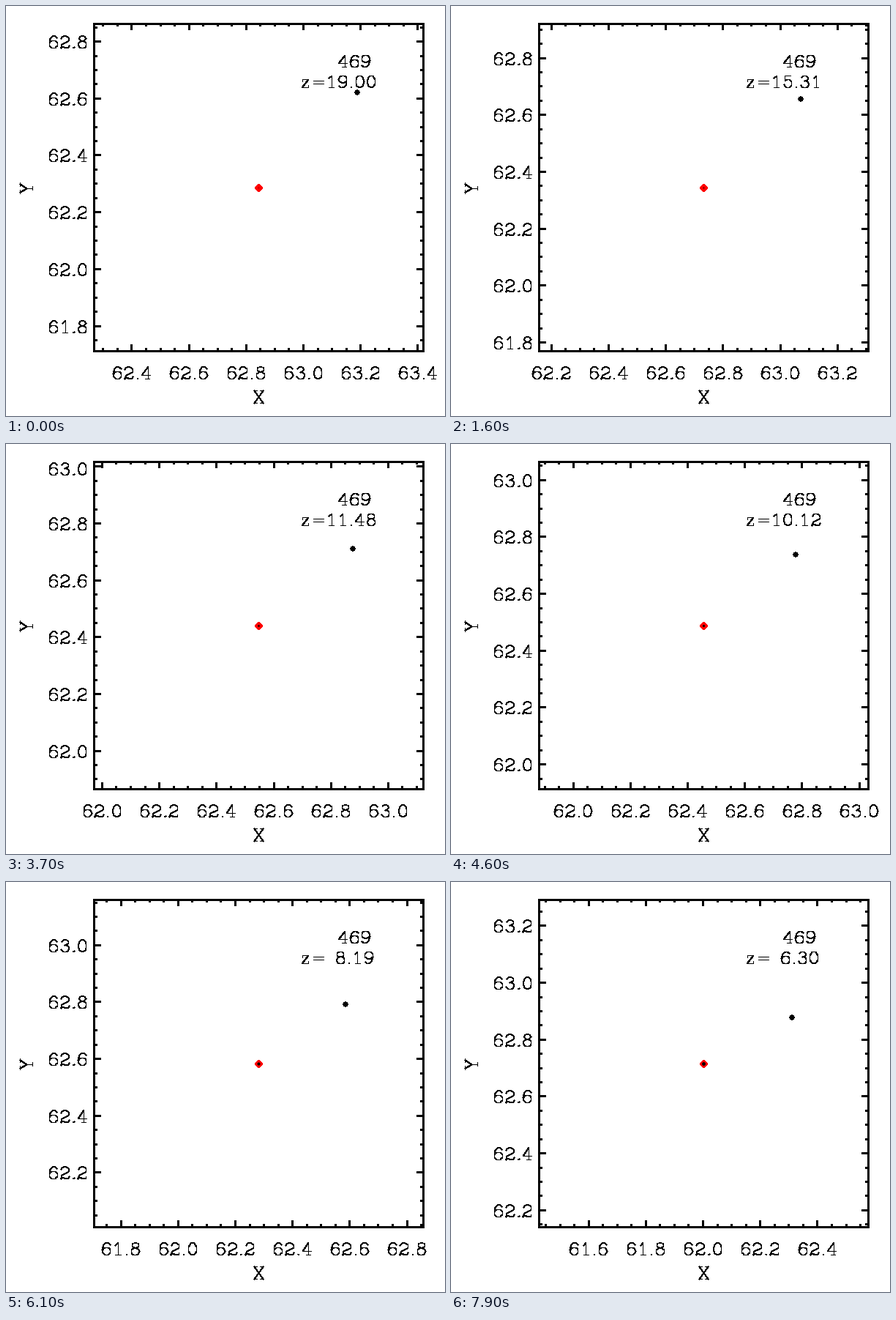
Recreate the animation shown at these times as a matplotlib script. Size 600x560 px, loop 8 s.

```python
import math

import numpy as np
import matplotlib.pyplot as plt
from matplotlib.animation import FuncAnimation
from matplotlib.collections import LineCollection
from matplotlib.patches import Circle, Polygon

W, H, DPI = 600, 560, 100
FRAMES, STEP_MS = 80, 100
PX = 72 / DPI                      # one pixel in points

LEFT, RIGHT, TOP, BOTTOM = 120.5, 570.5, 24.5, 471.5
MX, MY = 345.5, 248.5              # where the followed object stays
SPAN = 1.151                       # data units across the plot
SX, SY = (RIGHT - LEFT) / SPAN, (BOTTOM - TOP) / SPAN
MINOR = 0.05
LABEL, NOTE = 0.79, 0.775          # pixels per glyph unit

# Expansion: 1 + z decays exponentially; positions run linearly in 1 / (1 + z).
Z0, RATE = 19.0, 0.012754
KEYS = np.array([0, 37, 55, 67, 79])
MID_X = [62.844, 62.5475, 62.354, 62.204, 62.0025]
MID_Y = [62.2854, 62.4394, 62.5404, 62.6274, 62.7144]
DOT_X = [480, 474, 467, 460, 466]
DOT_Y = [118, 143, 159, 175, 185]


def growth(i):
    return np.exp(RATE * i) / (1 + Z0)


# ---- stroke font: 21 units high, y down ---------------------------------

def arc(cx, cy, rx, ry, start=0, end=360):
    """Elliptic arc, clockwise on screen, 0 degrees at the right."""
    t = np.radians(np.linspace(start, end, 2 + (end - start) // 24))
    return list(zip(cx + rx * np.cos(t), cy + ry * np.sin(t)))


def bar(x0, x1, y):
    return [(x0, y), (x1, y)]


def turn(strokes):
    return [[(20 - x, 21 - y) for x, y in s] for s in strokes]


SIX = [arc(11, 12, 8, 12, 180, 310), arc(10, 14.5, 7, 6.5)]

# Each glyph: advance width, then its strokes.
GLYPHS = {
    "0": (20, [arc(10, 10.5, 7, 10.5)]),
    "1": (20, [[(6, 4), (10.5, 0), (10.5, 21)], bar(6, 15, 21)]),
    "2": (20, [arc(10, 6, 7, 6, 200, 400) + [(5, 15), (3, 21)],
               [(3, 20), (5, 18), (12, 21), (16, 20), (17, 17)]]),
    "3": (20, [arc(10, 4.5, 6, 4.5, 200, 450), arc(10, 15, 7, 6, 270, 520)]),
    "4": (20, [[(13, 21), (13, 0), (2, 15), (18, 15)], bar(9, 16, 21)]),
    "5": (20, [[(15, 0), (5, 0)] + arc(10, 14, 7, 7, 220, 520)]),
    "6": (20, SIX),
    "7": (20, [[(3, 6), (3, 3), (7, 0), (13, 3), (17, 0), (16, 6),
                (11, 13), (10, 21)]]),
    "8": (20, [arc(10, 4.5, 6, 4.5), arc(10, 15, 7, 6)]),
    "9": (20, turn(SIX)),
    ".": (10, [arc(5, 20, 0.8, 0.8)]),
    "=": (26, [bar(4, 22, 9), bar(4, 22, 15)]),
    " ": (16, []),
    "X": (20, [[(3, 0), (17, 21)], [(17, 0), (3, 21)]]
          + [bar(x, x + 6, y) for x in (1, 13) for y in (0, 21)]),
    "Y": (21, [[(4, 0), (10.5, 11), (10.5, 21)], [(17, 0), (10.5, 11)],
               bar(1, 7, 0), bar(14, 20, 0), bar(7, 14, 21)]),
    "z": (18, [[(3, 11), (3, 7), (14, 7), (2, 21), (14, 21), (14, 17)]]),
}


def snap(v):
    return math.floor(v) + 0.5


def text(s, x, base, unit=LABEL, align=0.0, upright=True):
    """Pixel-snapped strokes of a string; base is the baseline row."""
    pen = -align * unit * sum(GLYPHS[c][0] for c in s)
    out = []
    for c in s:
        adv, strokes = GLYPHS[c]
        for stroke in strokes:
            pts = [(pen + u * unit, (v - 21) * unit) for u, v in stroke]
            if not upright:
                pts = [(dy, -dx) for dx, dy in pts]
            out.append([(snap(x + dx), snap(base + dy + 0.5))
                        for dx, dy in pts])
        pen += adv * unit
    return out


# ---- plot ---------------------------------------------------------------

def ticks(mid):
    """Tick values in view, each with its length and a flag for a label."""
    first = math.ceil((mid - SPAN / 2) / MINOR)
    last = math.floor((mid + SPAN / 2) / MINOR)
    for k in range(first, last + 1):
        major = k % 4 == 0
        yield k * MINOR, 9 if major else 4.5, major


def build(xm, ym, z):
    marks = []
    words = text("469", 453, 83, NOTE) + text(f"z={z:5.2f}", 403, 111, NOTE)
    words += text("X", MX, 542, align=0.5)
    words += text("Y", 36, MY, align=0.5, upright=False)
    for v, n, major in ticks(xm):
        x = MX + (v - xm) * SX
        p = snap(x)
        marks += [[(p, BOTTOM), (p, BOTTOM - n)], [(p, TOP), (p, TOP + n - 1)]]
        if major:
            words += text(f"{v:.1f}", x, 509, align=0.5)
    for v, n, major in ticks(ym):
        y = MY - (v - ym) * SY
        p = snap(y)
        marks += [[(LEFT, p), (LEFT + n, p)], [(RIGHT, p), (RIGHT - n, p)]]
        if major:
            base = min(max(math.floor(y + 9), 42), 469)
            words += text(f"{v:.1f}", 57, base)
    return marks, words


fig = plt.figure(figsize=(W / DPI, H / DPI), dpi=DPI, facecolor="white")
ax = fig.add_axes([0, 0, 1, 1])
ax.set(xlim=(0, W), ylim=(H, 0))
ax.axis("off")


def strokes(width, cap, segments=()):
    lines = LineCollection(segments, colors="black", linewidths=width * PX,
                           antialiaseds=False, capstyle=cap)
    lines.set_snap(False)
    return ax.add_collection(lines, autolim=False)


def shape(patch, color, order):
    patch.set(facecolor=color, edgecolor="none", antialiased=False,
              zorder=order)
    return ax.add_patch(patch)


strokes(3, "projecting", [[(LEFT, y), (RIGHT, y)] for y in (TOP, BOTTOM)]
        + [[(x, TOP), (x, BOTTOM)] for x in (LEFT, RIGHT)])
tick_lines = strokes(3, "butt")
labels = strokes(1, "projecting")

R = 5.5
shape(Polygon([(MX - R, MY), (MX, MY - R), (MX + R, MY), (MX, MY + R)]),
      "red", 3)
core = shape(Circle((MX, MY), 0), "black", 4)
core.set_antialiased(True)
dot = shape(Circle((0, 0), 3.1), "black", 4)


def update(i):
    a = growth(i)

    def at(values):
        return float(np.interp(a, growth(KEYS), values))

    marks, words = build(at(MID_X), at(MID_Y), 1 / a - 1)
    tick_lines.set_segments(marks)
    labels.set_segments(words)
    dot.center = round(at(DOT_X)), round(at(DOT_Y))
    core.set_radius(min(2.4, 27 * a - 0.9))
    return tick_lines, labels, dot, core


anim = FuncAnimation(fig, update, frames=FRAMES, interval=STEP_MS,
                     repeat=True, repeat_delay=0, blit=False)
plt.show()
```
